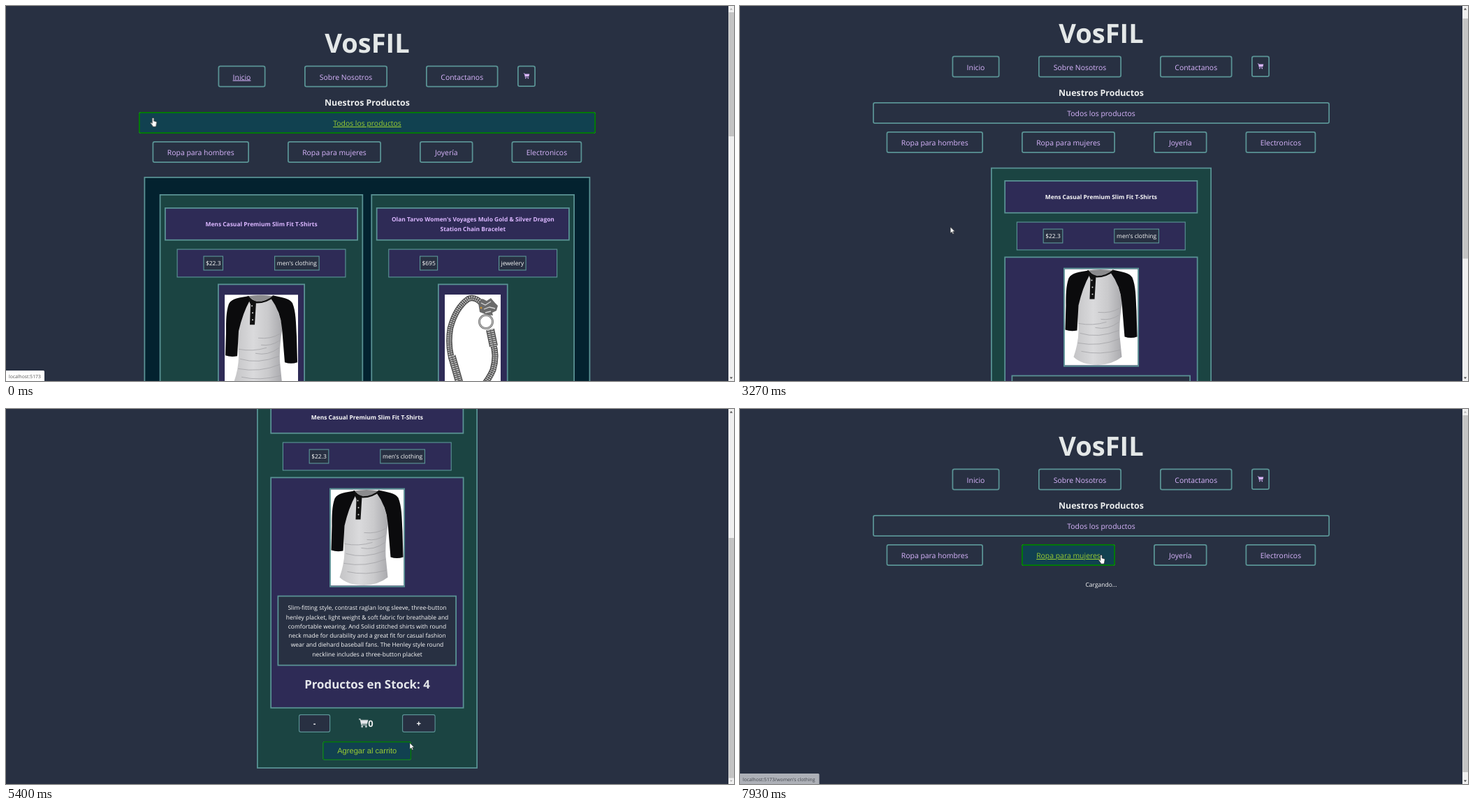
These frames come from a looping animation (1042x538 px, 8000 ms). An HTML page:

```html
<!DOCTYPE html>
<html lang="es">
<head>
<meta charset="utf-8">
<title>Tienda</title>
<style>
  html, body { margin: 0; width: 100%; height: 100%; overflow: hidden; background: #283042; }
  svg { display: block; }
  text { font-family: "Open Sans", "Noto Sans", sans-serif; text-rendering: geometricPrecision; text-anchor: middle; white-space: pre; }
  .logo { font-size: 38px; font-weight: 700; fill: #e4e8e8; }
  .head { font-size: 12.4px; font-weight: 700; fill: #eceeee; }
  .link { font-size: 10.42px; fill: #dab6ff; }
  .hot { font-size: 10.42px; fill: #9acd32; text-decoration: underline; }
  .name { font-size: 8.42px; font-weight: 700; fill: #dab6ff; }
  .name.plain { fill: #f8f8f8; }
  .name.over { fill: #f49a94; text-decoration: underline; }
  .body { font-size: 8.47px; fill: #fafafa; }
  .stock { font-size: 16.86px; font-weight: 700; fill: #e4e6ea; }
  .count { font-size: 12.9px; font-weight: 700; fill: #eceeee; }
  .btn { font: 11.1px "Liberation Sans", Arial, sans-serif; fill: #fff; }
  .sign { font-weight: 700; }
  .btn.on { fill: #9acd32; }
  .url { font-size: 6.8px; fill: #555; text-anchor: start; }
</style>
</head>
<body>
<svg id="stage" width="1042" height="538" viewBox="0 0 1042 538"></svg>
<script>
const LOOP = 8000, TICK = 67;
const TEAL = '#5a9395', DARK = '#283042', PURPLE = '#2e2b56', GREEN = '#1b4442', HOT = '#114150';
const THIN = 1.15, ROUND = 2.4;

// Box given by its outer edges
const box = (x1, y1, x2, y2, fill = 'none', w = 1.75, rx = 0, stroke = TEAL) =>
  `<rect x="${x1 + w / 2}" y="${y1 + w / 2}" width="${x2 - x1 - w}" height="${y2 - y1 - w}" rx="${rx}"
    fill="${fill}" stroke="${stroke}" stroke-width="${w}"/>`;
const fill = (x, y, w, h, color, extra = '') =>
  `<rect x="${x}" y="${y}" width="${w}" height="${h}" fill="${color}" ${extra}/>`;
const text = (x, y, cls, s) => `<text x="${x}" y="${y}" class="${cls}">${s}</text>`;
const group = (id, ...parts) => `<g id="${id}">${parts.join('')}</g>`;

const navBox = (x1, y1, x2, y2, label, cls = 'link') =>
  box(x1, y1, x2, y2, 'none', 1.75, ROUND) + text((x1 + x2) / 2, y1 + 20, cls, label);
const hotBox = (id, x1, y1, x2, y2, label) => group(id,
  box(x1, y1, x2, y2, HOT, 1.75, ROUND, '#008000') + text((x1 + x2) / 2, y1 + 20, 'hot', label));
const button = (x1, y1, x2, y2, label, cls, on) =>
  box(x1, y1, x2, y2, on ? HOT : DARK, THIN, ROUND, on ? '#008000' : TEAL) +
  text((x1 + x2) / 2, y1 + 17, cls + (on ? ' on' : ''), label);

const cart = (x, y, size, color) => `<g transform="translate(${x} ${y}) scale(${size / 16})" fill="${color}">
  <path d="M0 1h2.8l.6 2H16l-1.8 7H5l.3 1.2h8.5v1.2H4.2L1.9 2.4H0z"/>
  <circle cx="5.6" cy="14.3" r="1.5"/><circle cx="12.4" cy="14.3" r="1.5"/></g>`;

const nameBox = (dx, dy, lines, cls) =>
  box(227 + dx, 289 + dy, 504 + dx, 336.6 + dy, PURPLE) +
  lines.map((s, i) => text(365.6 + dx, 316 + dy + (i - (lines.length - 1) / 2) * 13.3, cls, s)).join('');
const tag = (x1, x2, y, s) => box(x1, y, x2, y + 21, DARK, THIN) + text((x1 + x2) / 2, y + 13.7, 'body', s);
const facts = (dx, dy, price, kind) =>
  box(244.5 + dx, 348.5 + dy, 486.5 + dx, 389.5 + dy, PURPLE, THIN) +
  tag(...price.slice(0, 2), 358.5 + dy, price[2]) + tag(...kind.slice(0, 2), 358.5 + dy, kind[2]);

const shirt = `
  <linearGradient id="cloth"><stop offset="0" stop-color="#c4c4c6"/><stop offset=".4" stop-color="#dadadc"/>
    <stop offset=".7" stop-color="#cacacc"/><stop offset="1" stop-color="#a8a8ac"/></linearGradient>
  <g id="shirt">
    ${fill(0, 0, 105, 138, '#fff')}
    <path fill="url(#cloth)" d="M31 3Q52 14 70 3L83 46Q78 72 79 96L82 126Q68 137 48 137.500Q24 137 13 126Q20 106 20 88L18 48Z"/>
    <path fill="none" stroke="#a2a2a6" stroke-width=".8" d="M22 92Q48 100 78 88M19 106Q50 112 79 100M20 78Q40 82 60 76M24 118Q50 124 80 116M48 62Q66 64 79 56M44 84Q62 88 78 76M52 72Q66 74 78 66"/>
    <path fill="#0b0b0d" d="M34 2C22 4 10 5 6 13C2 24 2 38 2 52L1 87Q9 90 18 88L20 52Q26 26 36 8Z"/>
    <path fill="#0b0b0d" d="M69 1C82 4 93 5 97 12C102 24 102 40 103 60L104 97Q95 100 86 97L82 48Q80 24 66 5Z"/>
    <path fill="#8b8b8d" d="M33 2Q52 -1 69 2Q58 10 45 10Z"/>
    <path fill="none" stroke="#111" stroke-width="2.400" d="M33 2Q37 8 46 11Q60 11 70 2"/>
    <path fill="#111" d="M33 4L45 10L43 43H36L37 14Z"/>
    <g fill="#ddd"><circle cx="39" cy="16" r="1"/><circle cx="40" cy="26" r="1"/><circle cx="40" cy="36" r="1"/></g>
  </g>`;

const strand = (d, w) => `<g fill="none"><path d="${d}" stroke="#4a4a4a" stroke-width="${w}"/>
  <path d="${d}" stroke="#c4c4c4" stroke-width="${w - 2.5}" stroke-dasharray="1.6 1.300"/>
  <path d="${d}" stroke="#5c5c5c" stroke-width="1"/></g>`;
const bracelet = `<g transform="translate(628 414)">
  ${fill(0, 0, 80, 138, '#fff')}
  ${strand('M54 14Q44 2 34 6Q16 18 8 48Q4 72 10 92L22 130', 8.5)}
  ${strand('M10 88L22 130', 11)}
  ${strand('M69 70Q75 88 69 108Q64 120 54 132', 9)}
  ${strand('M65 50L70 74', 12)}
  <circle cx="59" cy="39" r="9.500" fill="none" stroke="#777" stroke-width="3"/>
  <circle cx="59" cy="39" r="9.500" fill="none" stroke="#d0d0d0" stroke-width="1"/>
  <path fill="#6a6a6a" d="M48 12L54 6L60 9L66 5L72 12L76 16L74 23L68 26L69 30L60 29L50 25Z"/>
  <path fill="none" stroke="#d6d6d6" stroke-width="1.300" d="M52 12L58 15L66 10M56 21L64 18L72 20M58 26L66 24"/>
  <circle cx="52" cy="19" r="1.500" fill="#c99236"/></g>`;

const shirtName = ['Mens Casual Premium Slim Fit T-Shirts'];
const jewelName = ['Olan Tarvo Women\'s Voyages Mulo Gold &amp; Silver Dragon', 'Station Chain Bracelet'];
const story = [
  'Slim-fitting style, contrast raglan long sleeve, three-button',
  'henley placket, light weight &amp; soft fabric for breathable and',
  'comfortable wearing. And Solid stitched shirts with round',
  'neck made for durability and a great fit for casual fashion',
  'wear and diehard baseball fans. The Henley style round',
  'neckline includes a three-button placket'];

const header =
  text(517, 67, 'logo', 'VosFIL') +
  navBox(303.5, 85.5, 371.5, 116.5, 'Inicio', 'link active') +
  navBox(427, 85.5, 546, 116.5, 'Sobre Nosotros') +
  navBox(601, 85.5, 704.5, 116.5, 'Contactanos') +
  box(732, 85.5, 758, 116, 'none', 1.75, ROUND) + cart(740.8, 96, 8.5, '#dab6ff') +
  text(517, 142.6, 'head', 'Nuestros Productos') +
  navBox(190, 152, 844, 183, 'Todos los productos', 'link active') +
  navBox(209.5, 194, 348, 225, 'Ropa para hombres') +
  navBox(403, 194, 537, 225, 'Ropa para mujeres') +
  navBox(592, 194, 668.5, 225, 'Joyería') +
  navBox(723.5, 194, 824.3, 225, 'Electronicos') +
  hotBox('hotAll', 190, 152, 844, 183, 'Todos los productos') +
  hotBox('hotWomen', 403, 194, 537, 225, 'Ropa para mujeres');

const list = group('list',
  box(197.5, 245, 836.3, 600, '#03222f'),
  box(219.7, 270, 511.2, 600, GREEN), box(522.4, 270, 814, 600, GREEN),
  nameBox(0, 0, shirtName, 'name'),
  group('hotName', nameBox(0, 0, shirtName, 'name over')),
  facts(0, 0, [282.4, 311, '$22.3'], [384, 448.7, 'men\'s clothing']),
  box(303, 398.5, 428, 600, PURPLE), '<use href="#shirt" x="313" y="414.300"/>',
  nameBox(302.8, 0, jewelName, 'name'),
  facts(302.7, 0, [592, 618.2, '$695'], [705, 744.7, 'jewelery']),
  box(618, 398.5, 718.6, 600, PURPLE), bracelet);

const stocks = [[7, 0, 5400], [4, 5400, 6800], [0, 6800, LOOP]];
const counts = [[0, 0, 4330], [1, 4330, 4470], [2, 4470, 4670], [3, 4670, 5400], [0, 5400, 5930],
  [1, 5930, 6130], [2, 6130, 6270], [3, 6270, 6470], [4, 6470, 6800], [0, 6800, LOOP]];
const plus = on => button(567, 714, 614.7, 740, '+', 'btn sign', on);
const add = on => button(453.5, 753, 580, 779.6, 'Agregar al carrito', 'btn', on);

const detail = group('detail',
  box(359, 245.7, 675, 791.8, GREEN),
  nameBox(151.3, -25, shirtName, 'name plain'),
  facts(151.3, -25, [433.6, 462.4, '$22.3'], [535.2, 600, 'men\'s clothing']),
  box(378.3, 373.5, 655.5, 705.6, PURPLE),
  '<use href="#shirt" x="464.500" y="391.400"/>', box(463, 389.6, 571, 531.6),
  box(388.5, 543.6, 645, 644.5, DARK),
  story.map((s, i) => text(517, 564.2 + i * 13.3, 'body', s)).join(''),
  stocks.map(([n], i) => group('stock' + i, text(517, 677.2, 'stock', 'Productos en Stock: ' + n))).join(''),
  button(419, 714, 464.2, 740, '-', 'btn sign'), plus(), add(),
  group('hotPlus', plus(true)), group('hotAdd', add(true)),
  cart(505, 719.5, 13.5, '#e4e6ea'),
  counts.map(([n], i) => group('count' + i, text(522, 731.9, 'count', n))).join(''));

const status = (id, w, s) => group(id, fill(-2, 523, w + 2, 17, '#fff', 'rx="1.500"'), text(4, 533.5, 'url', s));
const thumb = (id, h) => group(id, fill(1034.5, 9, 7.5, h, '#c4c4c4'));
const arrows = color => [`<path fill="${color}" d="M1036 5.500h4l-2-2.500z"/>`, `<path fill="${color}" d="M1036 532.500h4l-2 2.500z"/>`];
const [upDim, downDim] = arrows('#b0b0b0'), [up, down] = arrows('#505050');

stage.innerHTML = `<defs>${shirt}</defs>` + fill(0, 0, 1042, 538, DARK) +
  group('page', header, list, detail, group('loading', text(517, 255, 'body', 'Cargando...'))) +
  fill(1034, 0, 8, 538, '#f0f0f0') + upDim + downDim + group('up', up) + group('down', down) +
  thumb('thumbList', 178) + thumb('thumbLoading', 512) + thumb('thumbDetail', 344.5) +
  status('urlAll', 55, 'localhost:5173') + status('urlItem', 96.5, 'localhost:5173/productos/1') +
  status('urlWomen', 113.5, 'localhost:5173/women\'s clothing') +
  group('cursor',
    `<g id="hand"><path transform="translate(-4 0)" fill="#fff" stroke="#222" stroke-width=".7"
      d="M2.800 1.400a1.200 1.200 0 0 1 2.400 0V5l3 .7c.8.2 1.100.8 1 1.600l-.6 4-.7 1.900H3.700L2.600 11 .4 8.300c-.6-.9.4-1.700 1.200-1L2.800 8.400z"/></g>`,
    '<g id="arrow"><path fill="#fff" stroke="#222" stroke-width=".5" d="M0 0V9l2-1.900 1.500 3.100 1.400-.7L3.400 6.600H6.200z"/></g>',
    '<g id="beam"><path fill="none" stroke="#a4a8b0" stroke-width=".8" d="M-1.500-5h3M0-5V5M-1.500 5h3"/></g>');

// Frames are [ms, value, easing]; the last value holds to the end of the loop
function track(el, prop, frames, easing = 'steps(1, end)') {
  const last = frames[frames.length - 1];
  const all = last[0] < LOOP ? [...frames, [LOOP, last[1]]] : frames;
  el.animate(all.map(([t, v, ease]) => ({ offset: t / LOOP, [prop]: v, easing: ease || easing })),
    { duration: LOOP, iterations: Infinity });
}
const byId = id => document.getElementById(id);
function show(id, ...spans) {
  const frames = spans[0][0] > 0 ? [[0, 0]] : [];
  for (const [on, off] of spans) {
    frames.push([on, 1]);
    if (off < LOOP) frames.push([off, 0]);
  }
  track(byId(id), 'opacity', frames);
}

// Screens
for (const id of ['list', 'thumbList']) show(id, [0, 2600]);
for (const id of ['loading', 'thumbLoading']) show(id, [2600, 2730], [7870, LOOP]);
for (const id of ['detail', 'thumbDetail']) show(id, [2730, 7870]);
document.querySelectorAll('.active').forEach(el =>
  track(el, 'textDecorationLine', [[0, 'underline'], [2600, 'none']]));

// Hover states
show('hotAll', [0, 2067]);
show('hotWomen', [2067, 2133], [7673, LOOP]);
show('hotName', [2400, 2600]);
show('hotPlus', [4200, 4930], [5670, 6597], [6934, 6998]);
show('hotAdd', [5130, 5470], [6663, 6870]);

// Counters
stocks.forEach(([, on, off], i) => show('stock' + i, [on, off]));
counts.forEach(([, on, off], i) => show('count' + i, [on, off]));

// Address bubbles
show('urlAll', [0, 2200]);
track(byId('urlItem'), 'opacity', [[0, 0], [2450, 0], [2510, 1], [2680, 1], [2780, 0]], 'linear');
track(byId('urlWomen'), 'opacity', [[0, 0], [7800, 0], [7925, .62]], 'linear');

// Scrolling, held between screen refreshes
const scroll = [[0, 0], [3130, 0], [3200, 4], [3270, 14], [3400, 75], [3530, 160], [3670, 230], [3800, 268], [3870, 274],
  [3930, 276], [7000, 276], [7070, 262], [7130, 235], [7200, 196.5], [7270, 155], [7400, 70], [7530, 15], [7600, 0]];
const shift = k => scroll.map(([t, y], i) => {
  const next = i + 1 < scroll.length ? scroll[i + 1][0] : LOOP;
  return [t, `translate(0px, ${y * k}px)`, `steps(${Math.round((next - t) / TICK)}, end)`];
});
track(byId('page'), 'transform', shift(-1));
track(byId('thumbDetail'), 'transform', shift(176 / 276));
show('up', [3200, 7600]);
show('down', [0, 3930], [7000, LOOP]);

// Pointer: [start, end, steps, x, y]
const moves = [[1200, 1600, 5, 479, 160], [2000, 2470, 7, 301.2, 317], [3530, 3870, 5, 442, 348],
  [3930, 4270, 5, 590, 452], [4730, 5200, 7, 578, 479], [5470, 5870, 6, 590, 452],
  [6530, 6730, 3, 577, 483], [6870, 7190, 5, 586, 421], [7270, 7740, 7, 517, 209]];
let place = 'translate(210.5px, 160px)';
const path = [[0, place]];
for (const [start, end, n, x, y] of moves) {
  path.push([start, place, `steps(${n}, start)`]);
  place = `translate(${x}px, ${y}px)`;
  path.push([end, place]);
}
track(byId('cursor'), 'transform', path);
show('hand', [0, 2133], [2400, 2670], [7673, LOOP]);
show('beam', [3797, 3998], [7126, 7337]);
show('arrow', [2133, 2400], [2670, 3797], [3998, 7126], [7337, 7673]);
</script>
</body>
</html>
```
